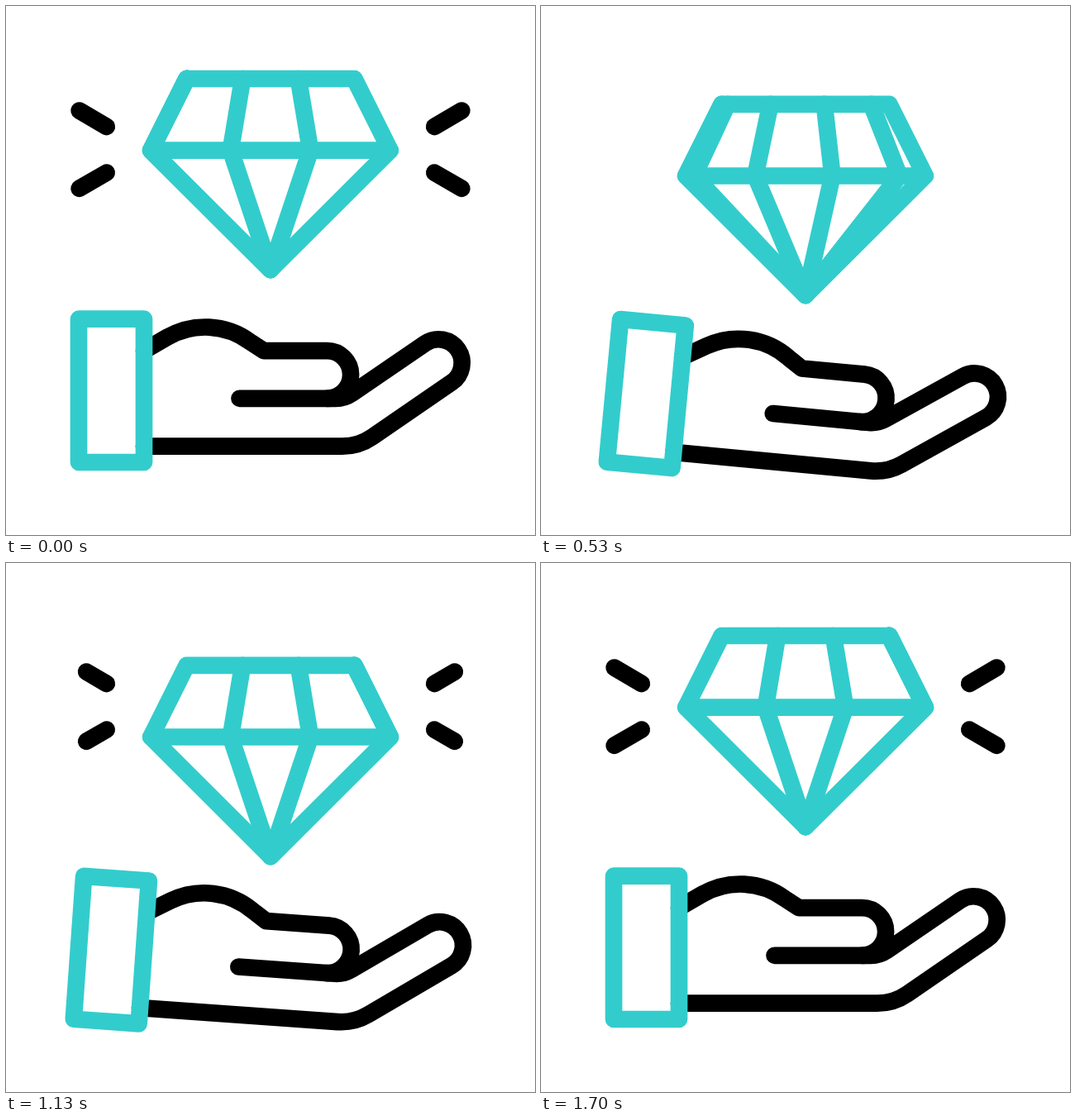
An HTML page with a canvas that plays this animation: 640x640 px, repeating every 2 s.

```html
<!DOCTYPE html>
<html lang="en">
<head>
<meta charset="utf-8">
<title>Diamond in hand</title>
<style>
html, body { margin: 0; width: 100%; height: 100%; overflow: hidden; background: #fff; }
canvas { display: block; width: 640px; height: 640px; }
</style>
</head>
<body>
<canvas id="stage" width="640" height="640"></canvas>
<script>
const ctx = document.getElementById('stage').getContext('2d');
const TEAL = '#33cccc', INK = '#000';
const LOOP = 2000, STEP = 100 / 3, LAST = 51;
const RAD = Math.PI / 180;

const mix = (a, b, u) => a + (b - a) * u;

// Eased progress from 0 to 1 between two steps.
function ease(n, from, to) {
  const u = Math.min(1, Math.max(0, (n - from) / (to - from)));
  return u * u * (3 - 2 * u);
}

// A quick drop followed by a slower rise.
const bounce = (n, start, depth) =>
  depth * (ease(n, start, start + 8.5) - ease(n, start + 8.5, start + 23.5));

// Damped swings; the last two are quicker.
function tilt(n) {
  let angle = 0, from = 0;
  [11.4, -9.3, 4.6, -2.1, 0].forEach((peak, i) => {
    const to = from + (i < 3 ? 11.8 : 7.8);
    if (n > from) angle = mix(angle, peak, ease(n, from, to));
    from = to;
  });
  return angle;
}

// Facet k moves over the slots 0 (left edge) to 3 (right edge).
function facetSlot(k, n) {
  const start = k < 2 ? 6.2 : 7.7 + 5.9 * Math.sqrt(k - 2);
  const end = Math.min(31, 22 + 6.2 * k);
  return mix(Math.max(0, 2 - k), Math.min(3, 5 - k), ease(n, start, end));
}

function line(pts, closed) {
  ctx.beginPath();
  pts.forEach(([x, y]) => ctx.lineTo(x, y));
  if (closed) ctx.closePath();
  ctx.stroke();
}

function drawDiamond(n) {
  const tip = [320, 319];
  const crown = p => [320 + 67.6 * (p - 1.5), 88];
  const girdle = p => [320 + 96.5 * (p - 1.5), 174.6];
  ctx.save();
  ctx.translate(0, bounce(n, 0, 61.8) + bounce(n, 22.6, 39.8));
  ctx.strokeStyle = TEAL;
  line([crown(0), crown(3), girdle(3), tip, girdle(0)], true);
  line([girdle(0), girdle(3)]);
  for (let k = 0; k < 5; k++) {
    const p = facetSlot(k, n);
    line([crown(p), girdle(p), tip]);
  }
  ctx.restore();
}

function drawHand(n) {
  ctx.save();
  ctx.translate(88, 465.3);
  ctx.rotate(tilt(n) * RAD);
  ctx.translate(-88, -465.3);
  ctx.strokeStyle = INK;

  // Thumb
  ctx.beginPath();
  ctx.moveTo(167, 417);
  ctx.arc(241, 480.5, 92, -120 * RAD, -54 * RAD);
  ctx.lineTo(312, 417.2);
  ctx.arc(388.3, 446, 28.8, -90 * RAD, 90 * RAD);
  ctx.lineTo(282.5, 474.8);
  ctx.stroke();

  // Fingers and palm
  ctx.beginPath();
  ctx.moveTo(388, 474.8);
  ctx.arcTo(409.7, 474.8, 507.1, 408.3, 35);
  ctx.arc(523.2, 431.8, 28.5, -124.4 * RAD, 55.6 * RAD);
  ctx.arcTo(426.6, 532.7, 300, 532.7, 64);
  ctx.lineTo(167, 532.7);
  ctx.stroke();

  ctx.strokeStyle = TEAL;
  ctx.strokeRect(88, 378.7, 79, 173.3);
  ctx.restore();
}

function drawSparks(n) {
  const grow = ease(n, 26, 38);
  if (n > 10 && !grow) return;
  const out = 1 - grow;
  const from = n > 10 ? out : 0;
  const to = n > 10 ? 1 : 1 - ease(n, 0, 10);
  ctx.strokeStyle = INK;
  for (const side of [-1, 1]) {
    for (const [y0, y1] of [[126.5, 146], [220.8, 201.6]]) {
      const at = u => [320 + side * mix(231.4, 198.3, u), mix(y0, y1, u)];
      line([at(from), at(to + 0.001)]);
    }
  }
}

function draw(ms) {
  const t = Math.floor(ms % LOOP / 10) * 10;
  const n = Math.min(LAST, Math.floor((t + 4) / STEP));
  ctx.fillStyle = '#fff';
  ctx.fillRect(0, 0, 640, 640);
  ctx.lineWidth = 20.7;
  ctx.lineCap = ctx.lineJoin = 'round';
  drawSparks(n);
  drawDiamond(n);
  drawHand(n);
}

const start = performance.now();
function tick() {
  draw(performance.now() - start);
  requestAnimationFrame(tick);
}
tick();
</script>
</body>
</html>
```
